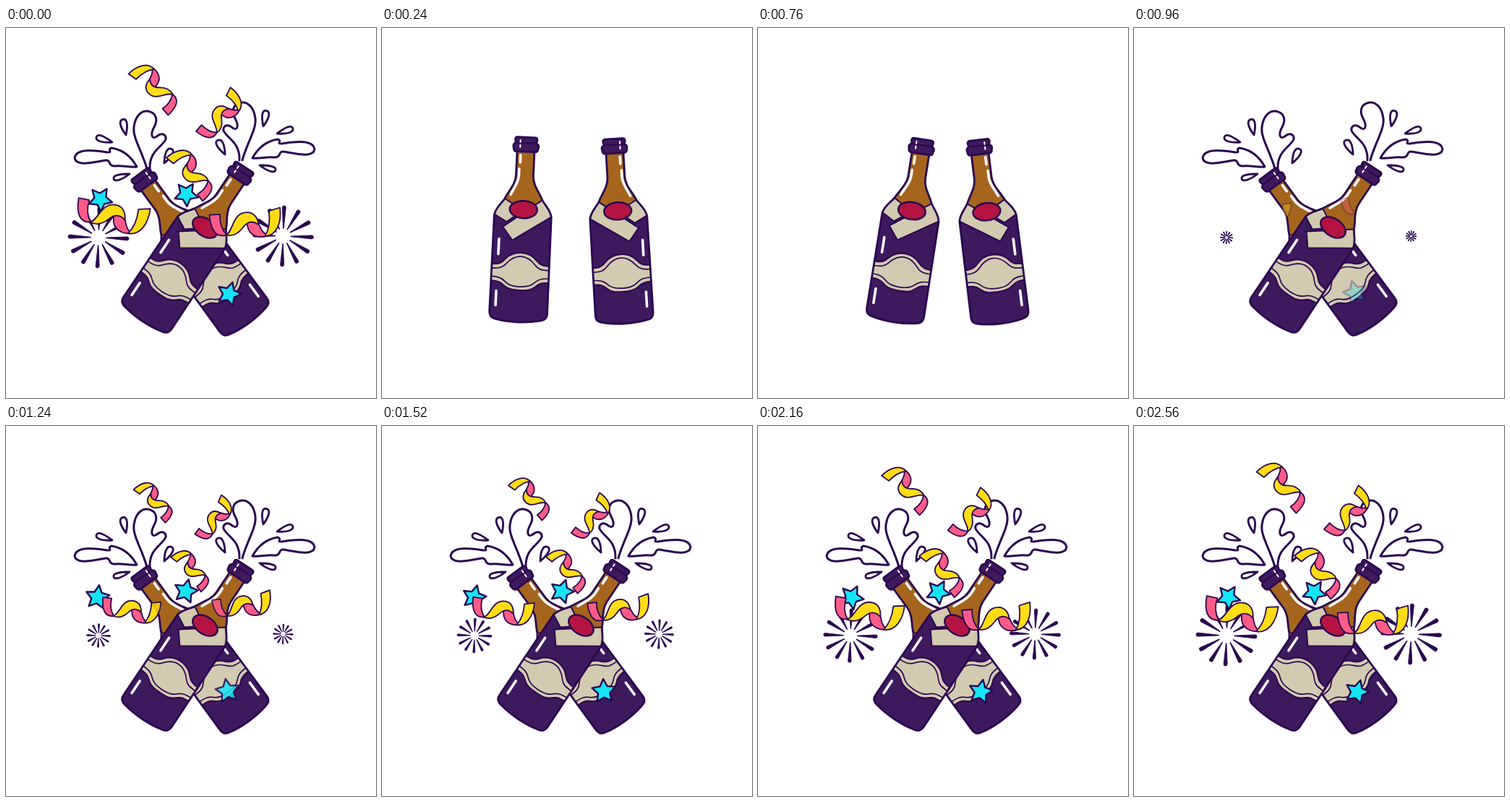
An HTML page with a canvas for the animation above (2600 ms loop, 512 px wide and 512 px high).

```html
<!DOCTYPE html>
<html>
<head>
<meta charset="utf-8">
<style>
html, body { margin: 0; height: 100%; overflow: hidden; background: #fff; }
canvas { display: block; width: 100vmin; height: 100vmin; }
</style>
</head>
<body>
<canvas id="stage" width="512" height="512"></canvas>
<script>
const INK = '#2a0750', PURPLE = '#3d195d', AMBER = '#a5651d', CREAM = '#d3cab1',
  RED = '#b51443', YELLOW = '#ffdc14', PINK = '#ff5b89', CYAN = '#14e5f5';
const LOOP = 2600, STEP = 40;

const stage = document.getElementById('stage').getContext('2d');
const layer = document.createElement('canvas');
layer.width = layer.height = 512;
const overlay = layer.getContext('2d');

const P = d => new Path2D(d);
const clamp = v => Math.max(0, Math.min(1, v));
const mix = (a, b, u) => a + (b - a) * u;
const linear = u => u;
const smooth = u => (1 - Math.cos(Math.PI * u)) / 2;

// Value at t through [time, value] keys.
function track(keys, t, ease = linear) {
  let i = 1;
  while (i < keys.length - 1 && t > keys[i][0]) i++;
  const [t0, v0] = keys[i - 1], [t1, v1] = keys[i];
  return mix(v0, v1, ease(clamp((t - t0) / (t1 - t0))));
}

function at(c, x, y, deg, sx, sy, draw) {
  c.save();
  c.translate(x, y);
  c.rotate(deg * Math.PI / 180);
  c.scale(sx, sy);
  draw();
  c.restore();
}

function paint(c, path, fill, width = 2, ink = INK) {
  c.lineJoin = c.lineCap = 'round';
  if (fill) { c.fillStyle = fill; c.fill(path); }
  if (width) { c.lineWidth = width; c.strokeStyle = ink; c.stroke(path); }
}

// Bottle: origin at the middle of its base, neck pointing up.
const body = P('M-12-237V-203C-12-190-22-180-26-170C-31-162-38-157-39.5-147L-40-14' +
  'C-40-6-36-4-30-3C-12 1 12 1 30-3C36-4 40-6 40-14L39.5-147C38-157 31-162 26-170C22-180 12-190 12-203V-237Z');
const glass = P('M-40-240H40V-172L26-170L0-155L-26-170L-40-172Z');
const bandBack = P('M-26-170L0-155L-22-138L-42-149Z');
const bandFront = P('M26-170L42-149L-13-113L-27-131Z');
const label = P('M-44-79C-32-79-28-79-22-86S-9-96 0-96S17-92 22-86S32-79 44-79V-56' +
  'C32-56 28-56 22-50S9-44 0-44S-17-45-22-50S-32-56-44-56Z');
const labelLines = P('M-44-73C-29-73-25-74-20-80S-9-91 0-91S15-86 20-80S29-73 44-73' +
  'M-44-62C-29-62-25-60-20-55S-9-49 0-49S15-50 20-55S29-62 44-62');
const seal = P('M-18.5-156a19 12 0 1 0 38 0a19 12 0 1 0-38 0Z');
const cap = P('M-13-256H13Q16-255 15-251L14-248Q19-246 17-241Q17-236 13-236H-13Q-17-236-17-241Q-19-246-14-248L-15-251Q-16-255-13-256Z');
const capLine = P('M-14-248H14');
const shine = P('M-7-231V-221M-8-212V-203C-8-193-15-184-18-176M-31.4-114V-93M-32-42V-22');
const capShine = P('M-8-252V-249M-8-245V-242');

function bottle(x, y, deg, side) {
  const c = stage;
  at(c, x, y, deg, side, 1, () => {
    c.save();
    c.clip(body);
    paint(c, body, PURPLE, 0);
    paint(c, glass, AMBER, 0);
    paint(c, bandBack, CREAM);
    paint(c, bandFront, CREAM);
    paint(c, label, CREAM);
    paint(c, labelLines, null, 1.7);
    c.restore();
    paint(c, seal, RED, 2.5);
    paint(c, body, null, 2.8);
    paint(c, shine, null, 3.6, '#fff');
    paint(c, cap, PURPLE, 2.8);
    paint(c, capLine, null, 2);
    paint(c, capShine, null, 2, '#fff');
  });
}

const plume = P('M195 195C189 172 175 152 177 137C179 121 188 114 196 115C209 117 210 128 205 137' +
  'C199 148 202 156 210 149C216 144 222 148 221 154C216 165 198 170 199 195');
const jet = P('M181 192C172 176 160 168 146 166C139 168 149 173 140 172C125 170 97 165 95 180' +
  'C97 192 120 186 138 183C146 182 140 192 152 191C162 190 170 193 181 192');

// Teardrop from its tip (x, y), length and half width.
function drop(x, y, deg, size, w) {
  at(stage, x, y, deg, 1, 1, () => paint(stage,
    P(`M0 0C${size * .4} ${-w} ${size} ${-w * 1.9} ${size} 0C${size} ${w * 1.4} ${size * .5} ${w} 0 0Z`), null, 2.8));
}

function splash() {
  paint(stage, plume, null, 3);
  paint(stage, jet, null, 3);
  drop(166, 148, -100, 22, 4.5);
  drop(147, 158, 199, 23, 4);
  drop(171, 202, 164, 23, 3.5);
  drop(219, 187, -62, 22, 4.5);
}

function firework(x, y, scale) {
  const ray = P('M11-.3L39.5-2.5A2.5 2.5 0 0 1 39.5 2.5L11 .3Z');
  for (let i = 0; i < 12; i++)
    at(stage, x, y, 2 + i * 30, scale, scale, () => paint(stage, ray, INK, .9 / scale));
}

// Curled ribbon centred between its two ends.
const curl = [
  [PINK, 'M-49.5 4.5L-34.5 3.5C-35 16-31 26-24.5 32.5C-39 37-47 27-49.5 4.5Z'],
  [PINK, 'M4.5.5C22 2 18 28 35 32C22 37 11 34 6 24C4 17 3 12-3 12Z'],
  [YELLOW, 'M34.5-2.5L50-7.5C53 14 46 32 29.5 33.5C35 24 37 14 34.5-2.5Z'],
  [YELLOW, 'M-26 32.5C-15 29-18 0 4 0C13 0 19 7 20 17C12 11 4 13-2 22C-8 30-16 35-26 32.5Z']
].map(([color, d]) => [color, P(d)]);

// Each value is a pair: early and settled.
const ribbons = [
  { x: [199, 198], y: [106, 91.5], turn: [-127, -127], size: [.67, .79] },
  { x: [249.5, 248], y: [206, 209], turn: [-124, -123], size: [.67, .78] },
  { x: [282, 287.5], y: [121, 113.5], turn: [-48, -45], size: [.68, .77] },
  { x: [168, 149.5], y: [242, 244], turn: [12.5, 15.5], size: [.85, 1] },
  { x: [326, 330], y: [240, 255], turn: [-2, 1], size: [.85, .98] }
];
const stars = [
  { x: [127.5, 130.5], y: [237, 237], turn: [14, 32] },
  { x: [249, 249.5], y: [229, 230], turn: [18, 33] },
  { x: [307, 308.5], y: [367, 368], turn: [-3, 17] }
];
const starPath = new Path2D();
for (let i = 0; i < 10; i++) {
  const r = i % 2 ? 8.5 : 17, a = (i / 5 - .5) * Math.PI;
  starPath.lineTo(r * Math.cos(a), r * Math.sin(a));
}
starPath.closePath();

function confetti(t) {
  const u = Math.min(1, (t - 1520) / 890), c = overlay;
  const now = pair => mix(pair[0], pair[1], u);
  c.clearRect(0, 0, 512, 512);
  for (const s of stars)
    at(c, now(s.x), now(s.y), now(s.turn), 1, 1, () => paint(c, starPath, CYAN, 2.4));
  for (const r of ribbons) {
    const k = now(r.size);
    at(c, now(r.x), now(r.y), now(r.turn), k, k, () => {
      for (const [color, path] of curl) paint(c, path, color, 1.8 / k);
    });
  }

  // While fading in, only painted areas are tinted; bare stage switches on at half opacity.
  const alpha = clamp((t - 800) / 520);
  stage.save();
  stage.globalAlpha = alpha;
  stage.globalCompositeOperation = 'source-atop';
  stage.drawImage(layer, 0, 0);
  if (alpha >= .5) {
    stage.globalAlpha = 1;
    stage.globalCompositeOperation = 'destination-over';
    stage.drawImage(layer, 0, 0);
  }
  stage.restore();
}

const leftTilt = [[200, 4], [400, -10], [600, 14], [760, 9]];
const rightTilt = [[200, -4.5], [400, 7], [600, -10.3], [760, -7]];
const leftBurst = [[800, .1], [960, .21], [1520, .57], [1880, .79], [2440, .98], [2560, 1]];
const rightBurst = [[800, .09], [960, .18], [1520, .48], [1880, .69], [2440, .98], [2560, 1]];

function clink(t) {
  bottle(336, 409, track(rightTilt, t, smooth), -1);
  bottle(188, 407, track(leftTilt, t, smooth), 1);
}

function party(t) {
  firework(128, 290, track(leftBurst, t));
  firework(383.5, 288, track(rightBurst, t));
  splash();
  at(stage, 522, -12, 0, -1, 1, splash);
  bottle(336.5, 408, -36.3, -1);
  bottle(188.5, 405.5, 33.7, 1);
  confetti(t);
}

function frame(time) {
  const t = Math.floor((time % LOOP) / STEP) * STEP;
  stage.clearRect(0, 0, 512, 512);
  if (t >= STEP && t < 800) clink(t);
  else party(t < STEP ? LOOP : t);
  requestAnimationFrame(() => frame(performance.now() - start));
}
const start = performance.now();
frame(0);
</script>
</body>
</html>
```
